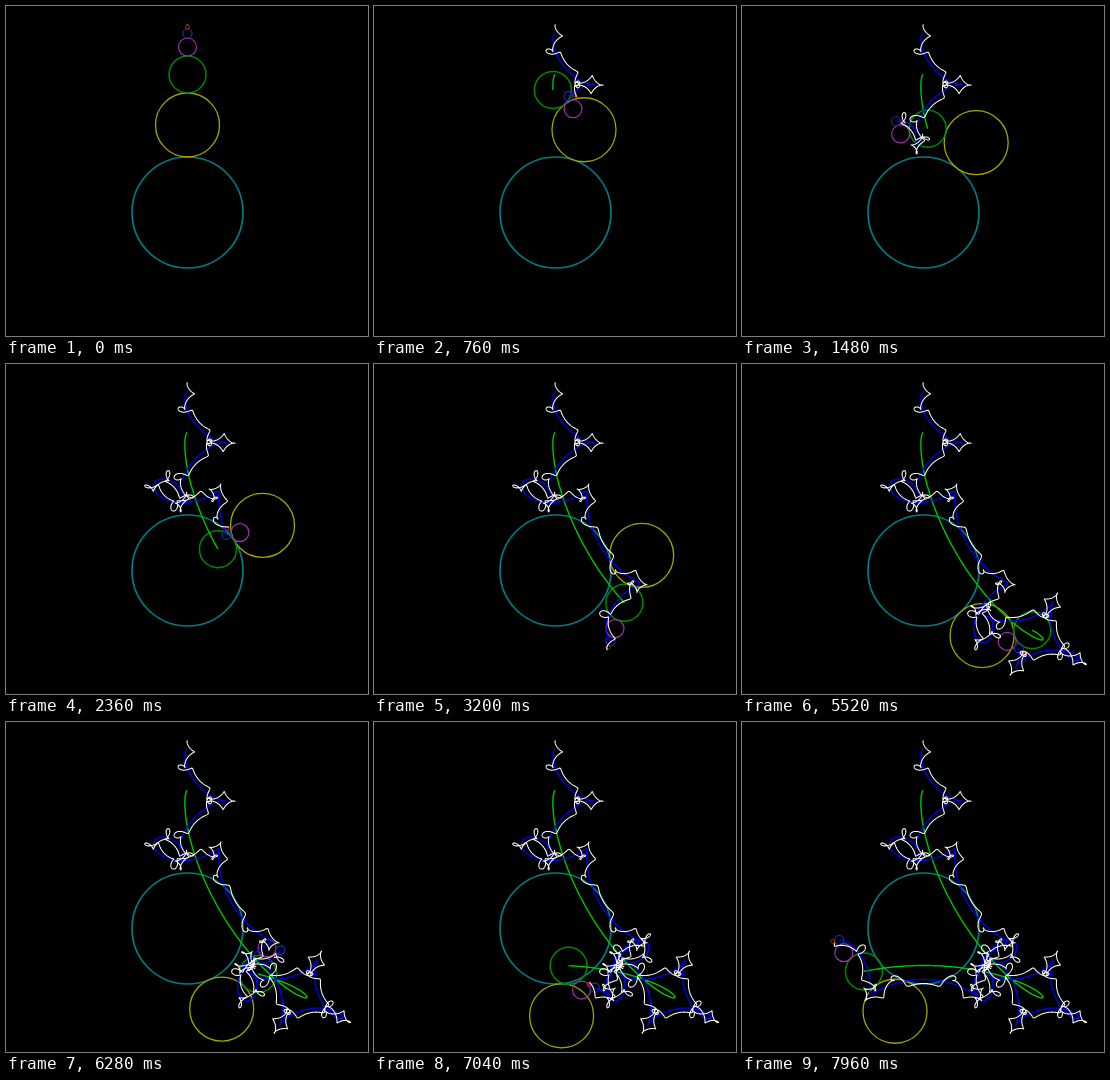
Write an HTML page with a canvas that moves like this. It is 362 px wide and 330 px high and loops after 8 s.

```html
<!DOCTYPE html>
<html lang="en">
<head>
<meta charset="utf-8">
<title>Rolling circles</title>
<style>
  html, body { margin: 0; width: 100%; height: 100%; overflow: hidden; background: #000; }
  canvas { display: block; }
</style>
</head>
<body>
<canvas id="stage" width="362" height="330"></canvas>
<script>
const ctx = document.getElementById('stage').getContext('2d');
const STEP_MS = 40, STEPS = 200, SUBSTEPS = 24;
const CENTER = [181.5, 206.5];
const RATIO = -3; // turn of each circle relative to its parent

const circles = [
  { r: 55.5, color: '#007c80', width: 1.7 },
  { r: 32, color: '#a4a400', width: 1.3 },
  { r: 18.5, color: '#008800', width: 1.5 },
  { r: 9, color: '#a030b0', width: 1.2 },
  { r: 4.5, color: '#1830b0', width: 1.2 },
  { r: 2, color: '#b02010', width: 1 },
  { r: 0.5, color: '#b06000', width: 1 }
];

const trails = [
  { circle: 2, color: '#00c400', width: 1.4 },
  { circle: 4, color: '#0000f0', width: 1.3 },
  { circle: 6, color: '#ffffff', width: 1.05 }
];

// Centres of all circles after the first one has turned by `degrees`.
function centersAt(degrees) {
  let [x, y] = CENTER, angle = 0, turn = degrees;
  return circles.map(({ r }, i) => {
    if (i > 0) {
      angle += turn;
      turn *= RATIO;
      const a = angle * Math.PI / 180, reach = circles[i - 1].r + r;
      x += reach * Math.sin(a);
      y -= reach * Math.cos(a);
    }
    return [x, y];
  });
}

const history = Array.from({ length: STEPS * SUBSTEPS }, (_, i) => centersAt(i / SUBSTEPS));

function stroke({ color, width }, trace) {
  ctx.beginPath();
  trace();
  ctx.strokeStyle = color;
  ctx.lineWidth = width;
  ctx.stroke();
}

function draw(step) {
  const now = step * SUBSTEPS;
  ctx.fillStyle = '#000';
  ctx.fillRect(0, 0, 362, 330);
  circles.forEach((circle, i) => {
    const [x, y] = history[now][i];
    stroke(circle, () => ctx.arc(x, y, circle.r, 0, Math.PI * 2));
  });
  for (const trail of trails) {
    stroke(trail, () => {
      for (let i = 0; i <= now; i++) ctx.lineTo(...history[i][trail.circle]);
    });
  }
}

ctx.lineJoin = 'round';
let shown = -1;
const start = performance.now();
function tick() {
  const step = Math.floor((performance.now() - start) / STEP_MS) % STEPS;
  if (step !== shown) draw(shown = step);
  requestAnimationFrame(tick);
}
tick();
</script>
</body>
</html>
```
